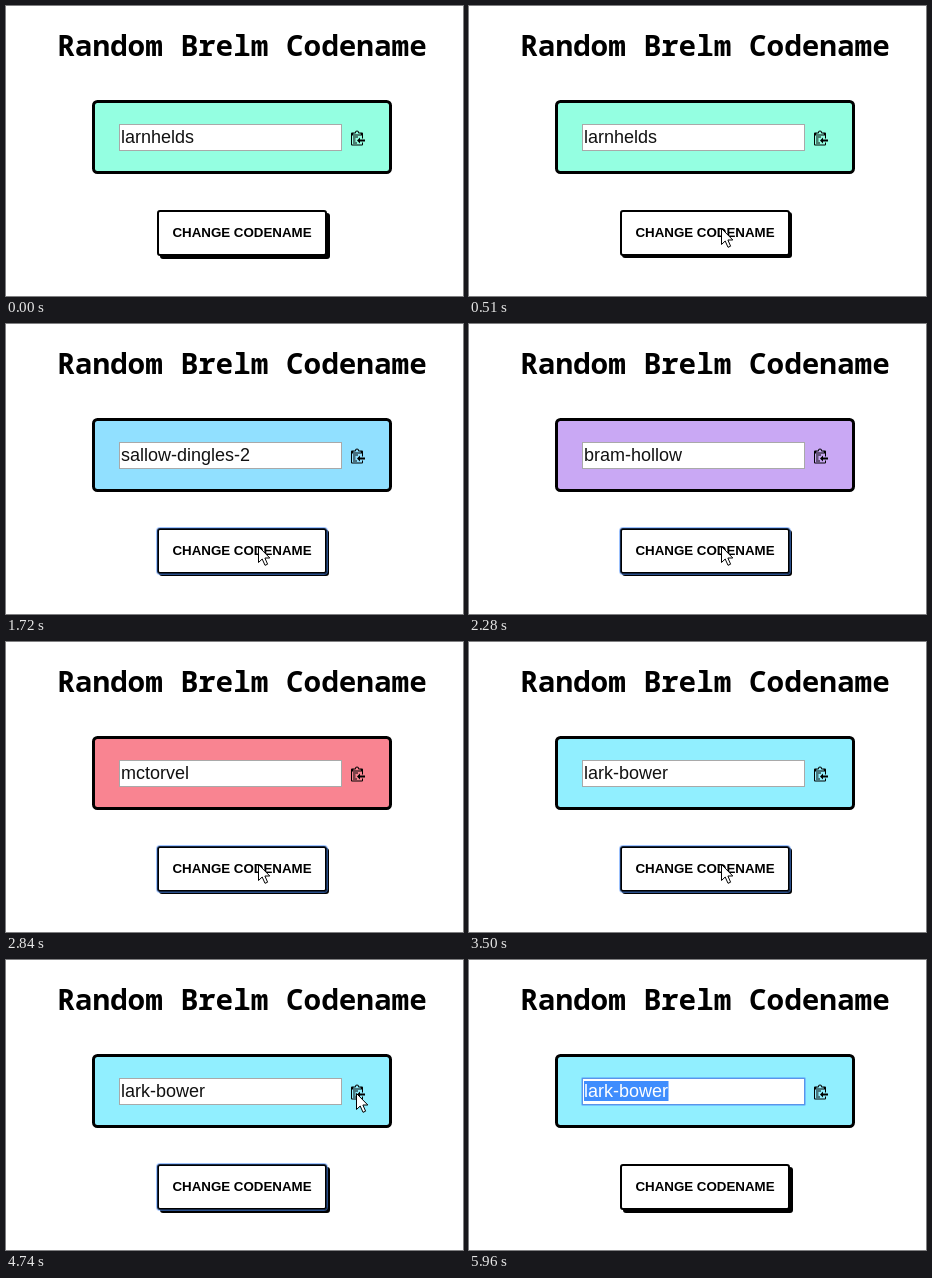
An HTML page for the animation above (7.3 s loop, 457 px wide and 290 px high).

```html
<!DOCTYPE html>
<html lang="en">
<head>
<meta charset="utf-8">
<title>Random Codename</title>
<style>
  html, body { margin: 0; width: 100%; height: 100%; overflow: hidden; background: #fff; }
  svg { display: block; }
  .title { font: bold 29.333px "Noto Sans Mono", Consolas, monospace; text-anchor: middle; }
  .word { font: 18px "Liberation Sans", Arial, sans-serif; fill: #111; }
  .label { font: bold 13.333px "Liberation Sans", Arial, sans-serif; text-anchor: middle; }
  .ring rect { fill: none; stroke: #4d90fe; }

  .card, .reel, .last, .shadow, .ring, .picked, .pointer {
    animation: 7300ms step-end infinite;
  }
  .card { animation-name: tint; }
  .reel { animation-name: roll; }
  .last { animation-name: invert; }
  .shadow { animation-name: press; }
  .ring { animation-name: focus; }
  .picked { animation-name: pick; }
  .pointer { animation-name: travel; }

  @keyframes tint {
    0% { fill: #94ffe1; }
    13.01% { fill: #f984cf; }
    23.56% { fill: #91e0ff; }
    31.23% { fill: #c9a8f4; }
    38.9% { fill: #f98491; }
    47.94%, 100% { fill: #91efff; }
  }
  @keyframes roll {
    0% { transform: translateY(0); }
    13.01% { transform: translateY(-40px); }
    23.56% { transform: translateY(-80px); }
    31.23% { transform: translateY(-120px); }
    38.9% { transform: translateY(-160px); }
    47.94%, 100% { transform: translateY(-200px); }
  }
  @keyframes invert {
    0% { fill: #111; }
    67.94%, 100% { fill: #fff; }
  }
  @keyframes press {
    0% { transform: translate(3px, 3px); }
    3.97% { transform: translate(2px, 2px); }
    57.26%, 100% { transform: translate(3px, 3px); }
  }
  @keyframes focus {
    0% { opacity: 0; }
    11.64% { opacity: 1; }
    66.3%, 100% { opacity: 0; }
  }
  @keyframes pick {
    0% { opacity: 0; }
    67.94%, 100% { opacity: 1; }
  }
  @keyframes travel {
    0% { transform: translate(500px, 300px); }
    3.97% { transform: translate(266px, 240px); }
    5.47% { transform: translate(256px, 229px); }
    6.98% { transform: translate(252px, 222px); }
    55.61% { transform: translate(259px, 218px); }
    57.26% { transform: translate(276px, 200px); }
    58.76% { transform: translate(297px, 180px); }
    60.27% { transform: translate(317px, 162px); }
    61.78% { transform: translate(335px, 147px); }
    63.42% { transform: translate(346px, 137px); }
    64.93% { transform: translate(350px, 133px); }
    78.63% { transform: translate(374px, 132px); }
    80.13% { transform: translate(428px, 130px); }
    81.64%, 100% { transform: translate(500px, 300px); }
  }
</style>
</head>
<body>
<svg width="457" height="290" viewBox="0 0 457 290">
  <text class="title" x="236" y="50">Random Brelm Codename</text>

  <rect class="card" x="87.5" y="95.5" width="297" height="71" rx="4" stroke="#000" stroke-width="3"/>
  <rect x="113.5" y="118.5" width="222" height="26" fill="#fff" stroke="#a9a9a9"/>
  <g class="picked">
    <rect x="112.5" y="117.5" width="224" height="28" rx="1" fill="none" stroke="#4d90fe" stroke-opacity=".45"/>
    <rect x="113.5" y="118.5" width="222" height="26" fill="none" stroke="#5b94e8"/>
    <rect x="115" y="121" width="84.5" height="20" fill="#3f8dfd"/>
  </g>
  <svg x="114" y="119" width="221" height="25">
    <g class="reel word">
      <text x="1" y="18">larnhelds</text>
      <text x="1" y="58">elk-dune</text>
      <text x="1" y="98">sallow-dingles-2</text>
      <text x="1" y="138">bram-hollow</text>
      <text x="1" y="178">mctorvel</text>
      <text class="last" x="1" y="218">lark-bower</text>
    </g>
  </svg>

  <!-- copy icon -->
  <g transform="translate(345 123.5)" fill-rule="evenodd">
    <path d="M8 3h3a1 1 0 0 1 1 1v5h-1V6H1v9h10v-2h1v2a1 1 0 0 1-1 1H1a1 1 0 0 1-1-1V4a1 1 0 0 1 1-1h3a2 2 0 0 1 4 0z
      M2 5h8a1 1 0 0 0-1-1H8a1 1 0 0 1-1-1a1 1 0 0 0-2 0a1 1 0 0 1-1 1H3a1 1 0 0 0-1 1z"/>
    <path d="M2 7.5h5M2 9.5h2.5M2 11.5h2.5M2 13.5h4" stroke="#000"/>
    <path d="M9 10V8l-3 3 3 3v-2h5v-2z"/>
  </g>

  <rect class="shadow" x="151" y="204" width="170" height="46" rx="3"/>
  <rect x="152" y="205" width="168" height="44" rx="2" fill="#fff" stroke="#000" stroke-width="2"/>
  <g class="ring">
    <rect x="150.5" y="203.5" width="171" height="47" rx="3" stroke-opacity=".55"/>
    <rect x="151.5" y="204.5" width="169" height="45" rx="2" stroke-opacity=".28"/>
  </g>
  <text class="label" x="236" y="231">CHANGE CODENAME</text>

  <path class="pointer" d="M.5.5V16.5L4.2 13 7 19.3 9.6 18.2 6.9 12H11.8z" fill="#fff" stroke="#000"/>
</svg>
</body>
</html>
```
